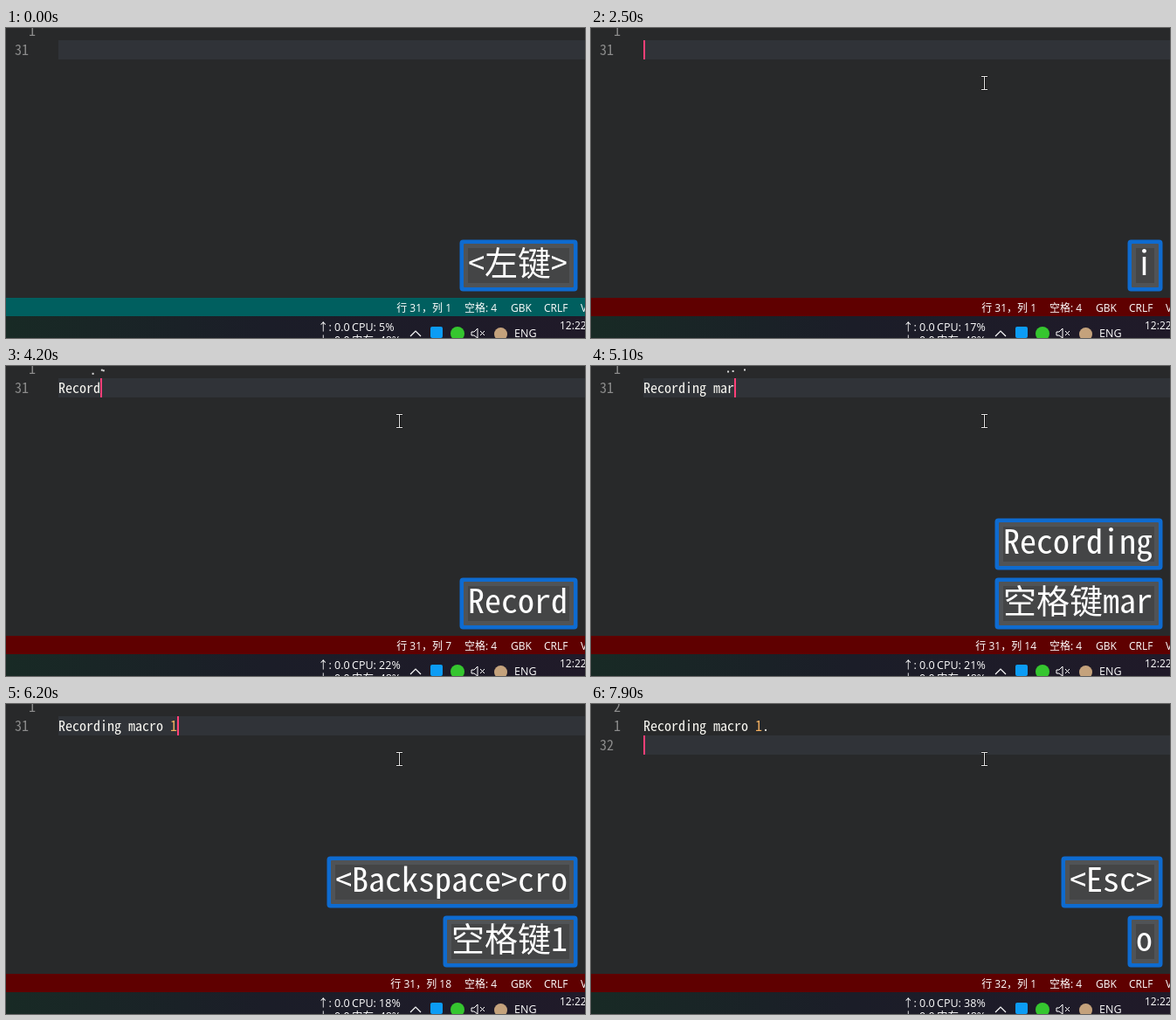
An HTML page with a canvas that plays this animation: 663 by 355 pixels, repeating every 8000 ms.

```html
<!DOCTYPE html>
<html lang="zh">
<head>
<meta charset="utf-8">
<style>
html, body { margin: 0; width: 100%; height: 100%; overflow: hidden; background: #28292a; }
canvas { display: block; }
</style>
</head>
<body>
<canvas id="stage" width="663" height="355"></canvas>
<script>
const ctx = document.getElementById('stage').getContext('2d');
const LOOP = 8000, CELL = 8, LEFT = 60, LINE = 22;
const MONO = '"Noto Sans Mono CJK SC", "Noto Sans Mono", "Noto Sans CJK SC", monospace';
const SANS = '"Open Sans", "Noto Sans CJK SC", "Noto Sans", sans-serif';
const PINK = '#ff3f78', PALE = '#fbfaf4';

// [time, key label, starts a new caption row]
const keys = [
  [-500, '<左键>', 1], [700, 'q'], [900, '1'], [2100, 'i', 1],
  [2900, 'R', 1], [3200, 'e'], [3500, 'c'], [3700, 'o'], [3900, 'r'], [4100, 'd'],
  [4300, 'i'], [4400, 'n'], [4600, 'g'],
  [4700, '空格键', 1], [4800, 'm'], [4900, 'a'], [5000, 'r'],
  [5400, '<Backspace>', 1], [5600, 'c'], [5700, 'r'], [5800, 'o'],
  [5900, '空格键', 1], [6000, '1'], [6500, '.'],
  [6900, '<Esc>', 1], [7500, 'o', 1]
];
const cpuLoad = [[0, 5], [200, 8], [1200, 13], [2200, 17], [3200, 29], [4200, 22], [5100, 21], [6100, 18], [7100, 38]];

function rect(x, y, w, h, color, radius = 0) {
  ctx.fillStyle = color;
  ctx.beginPath();
  ctx.roundRect(x, y, w, h, radius);
  ctx.fill();
}

function path(points, color, width) {
  ctx.strokeStyle = color;
  ctx.lineWidth = width;
  ctx.beginPath();
  points.forEach(([x, y]) => ctx.lineTo(x, y));
  ctx.stroke();
}

function label(str, x, y, color = '#fff', size = 12, align = 'left') {
  ctx.font = `${size}px ${SANS}`;
  ctx.textAlign = align;
  ctx.fillStyle = color;
  ctx.fillText(str, x, y);
}

const cells = ch => ch > '\u2e80' ? 2 : 1;
const cellCount = str => [...str].reduce((sum, ch) => sum + cells(ch), 0);

// Text on a fixed grid: wide characters take two cells.
function gridText(str, x, y, color, cell = CELL, weight = 400) {
  ctx.font = `${weight} ${cell * 2}px ${MONO}`;
  ctx.textAlign = 'center';
  ctx.fillStyle = color;
  for (const ch of str) {
    const width = cells(ch) * cell;
    ctx.fillText(ch, x + width / 2, y);
    x += width;
  }
}

function stateAt(t) {
  const state = { lines: [''], insert: false, rows: [], bursts: [], last: 0, column: 0 };
  for (const [time, key, fresh] of keys) {
    if (time > t) break;
    state.last = time;
    if (fresh) state.rows.push({ text: '', time });
    const row = state.rows.at(-1);
    row.text += key;
    row.time = time;

    const end = state.lines.length - 1;
    if (!state.insert) {
      if (key === 'i' || key === 'o') state.insert = true;
      if (key === 'o') state.lines.push('');
    } else if (key === '<Esc>') {
      state.insert = false;
    } else if (key === '<Backspace>') {
      state.lines[end] = state.lines[end].slice(0, -1);
    } else {
      state.lines[end] += key === '空格键' ? ' ' : key;
      state.bursts.push({ time, x: LEFT + state.lines[end].length * CELL });
    }
  }
  const length = state.lines.at(-1).length;
  state.column = state.insert ? length : Math.max(0, length - 1);
  state.rows = state.rows.slice(-2).filter(row => t - row.time < 1500);
  return state;
}

function drawEditor(t, state) {
  const { lines, insert, column } = state;
  const current = lines.length - 1;
  rect(0, 0, 663, 309, '#28292a');
  rect(LEFT, 14 + current * LINE, 603, LINE, '#303338');

  gridText(String(current + 1), 26, 9, '#8c8c8c');
  lines.forEach((text, i) => {
    const y = 31 + i * LINE;
    if (i === current) gridText(String(31 + i), 10, y, '#8c8c8c');
    else gridText('1', 26, y, '#8c8c8c');
    [...text].forEach((ch, n) =>
      gridText(ch, LEFT + n * CELL, y, ch === '1' ? '#f5b060' : PALE));
  });

  const phase = state.last < 2100 ? 200 : state.last;
  if (Math.floor((t - phase) / 500) % 2 === 0) {
    const x = LEFT + column * CELL, y = 14 + current * LINE;
    rect(x, y, insert ? 2 : CELL, LINE, PINK);
    if (!insert) gridText(lines[current][column] || '', x, y + 17, '#28292a');
  }
}

// Small sparks fly up from the caret at each typed character.
function drawSparks(t, bursts) {
  for (const { time, x } of bursts) {
    const age = (t - time) / 100;
    if (age > 2) continue;
    for (let i = 0; i < 3; i++) {
      const noise = n => Math.abs(Math.sin(time * 0.37 + i * 12.9 + n * 78.2) * 437.5) % 1;
      rect(x + (noise(1) * 24 - 10) * age, 12 - (4 + noise(2) * 8) * age, 2, 2, '#dcdcdc');
    }
  }
}

function drawSuggestions() {
  const items = [['g', 'reg reg_name; ('], ['ga', 'reg [N:0] reg_n'], ['gm', 'reg [N:0] reg_n']];
  rect(76, 36, 330, 89, '#454647');
  rect(77, 37, 328, 87, '#28292b');
  rect(406, 36, 257, 92, '#454647');
  rect(407, 37, 256, 90, '#28292b');
  rect(77, 37, 328, 22, '#1fa895');
  items.forEach(([rest, detail], i) => {
    const y = 53 + i * LINE, selected = i === 0;
    ctx.strokeStyle = '#e8e8e8';
    ctx.lineWidth = 1;
    ctx.strokeRect(81.5, y - 11.5, 12, 12);
    gridText('re', 99, y, selected ? '#7ef0ff' : '#58bfff', CELL, 700);
    gridText(rest, 99 + 2 * CELL, y, selected ? '#2ce5d0' : PALE, CELL, 700);
    const color = selected ? '#22e6cb' : '#bcbcbc';
    gridText(detail, 266, y, color);
    ctx.font = '13px "Noto Sans Mono", monospace';
    ctx.fillStyle = color;
    ctx.fillText('…', 390, y);
  });
  rect(77, 103, 328, 1, '#3b3c3d');
  label('Enter 插入', 81, 117, '#a2a2a2', 11);
  label('显示更多 (Ctrl+Space)', 394, 117, '#a2a2a2', 11, 'right');
  gridText('reg reg_name; (Verilog-HDL/SystemVeri', 412, 58, '#c4c4c4');
  gridText('log)', 412, 80, '#c4c4c4');
  gridText('reg', 412, 118, '#f572b0');
  gridText(';', 444, 118, PALE);
}

function drawPointer(t, arrow) {
  if (t < 100) return;
  const left = Math.max(0, (300 - t) / 200);
  const x = 450 + 132 * left ** 1.4, y = 63 - 38 * left ** 1.4;
  if (arrow) {
    ctx.fillStyle = '#fff';
    ctx.strokeStyle = '#000';
    ctx.lineWidth = 1;
    ctx.beginPath();
    [[0, 0], [0, 16], [4, 12.5], [6.5, 18], [9, 17], [6.5, 11.5], [11.5, 11.5]]
      .forEach(([dx, dy]) => ctx.lineTo(448.5 + dx, 63.5 + dy));
    ctx.closePath();
    ctx.fill();
    ctx.stroke();
    return;
  }
  const shape = (color, width) => {
    path([[x + .5, y - 7], [x + .5, y + 7]], color, width);
    for (const dy of [-7.5, 7.5]) path([[x - 3, y + dy], [x + 4, y + dy]], color, width);
  };
  shape('#111', 2.5);
  shape('#e4e4e4', 1);
}

function drawCaptions(rows) {
  rows.forEach(({ text }, i) => {
    const y = 243 - (rows.length - 1 - i) * 68;
    const width = cellCount(text) * 19 + 21, x = 654.5 - width;
    rect(x, y - .5, width, 59, '#0e6bd0', 4);
    rect(x + 4.5, y + 4, width - 9, 50, '#505356', 1);
    rect(x + 9.5, y + 9, width - 19, 40, '#444546');
    gridText(text, x + 9.5, y + 40, '#fff', 19);
  });
}

function drawBars(t, state) {
  rect(0, 309, 663, 21, state.insert ? '#5f0000' : '#005f5f');
  label(`行 ${30 + state.lines.length}，列 ${state.column + 1}`, 510, 325, '#fff', 12, 'right');
  label('空格: 4', 525, 325);
  label('GBK', 578, 325);
  label('CRLF', 616, 325);
  label('V', 658, 325);

  const shade = ctx.createLinearGradient(0, 0, 663, 0);
  shade.addColorStop(0, '#182a25');
  shade.addColorStop(.45, '#1b1d28');
  shade.addColorStop(1, '#201a29');
  rect(0, 330, 663, 25, shade);

  const load = cpuLoad.findLast(([time]) => time <= t)[1];
  label('↑: 0.0', 357, 347, '#fff', 12.5);
  label(`CPU: ${load}%`, 396, 347, '#fff', 12.5);
  label('↓: 0.0', 357, 362, '#fff', 12.5);
  label('内存: 48%', 396, 362, '#fff', 12.5);
  path([[463, 353], [469, 347], [475, 353]], '#fff', 1.2);
  rect(486, 342, 14, 13, '#0c9cf5', 2);
  rect(509, 342, 16, 16, '#35c62f', 8);
  path([[540, 344], [536, 348], [533, 348], [533, 352], [536, 352], [540, 355], [540, 344]], '#fff', 1);
  path([[543, 347], [548, 352]], '#fff', 1);
  path([[548, 347], [543, 352]], '#fff', 1);
  rect(559, 343, 15, 15, '#c4a27c', 7.5);
  label('ENG', 582, 354, '#fff', 12.5);
  label('12:22', 634, 345);
}

function frame() {
  const t = Math.floor(performance.now() % LOOP / 100) * 100;
  const state = stateAt(t);
  const suggesting = t >= 3200 && t < 3700;
  drawEditor(t, state);
  drawSparks(t, state.bursts);
  if (suggesting) drawSuggestions();
  drawBars(t, state);
  drawCaptions(state.rows);
  drawPointer(t, suggesting);
  requestAnimationFrame(frame);
}
frame();
</script>
</body>
</html>
```
